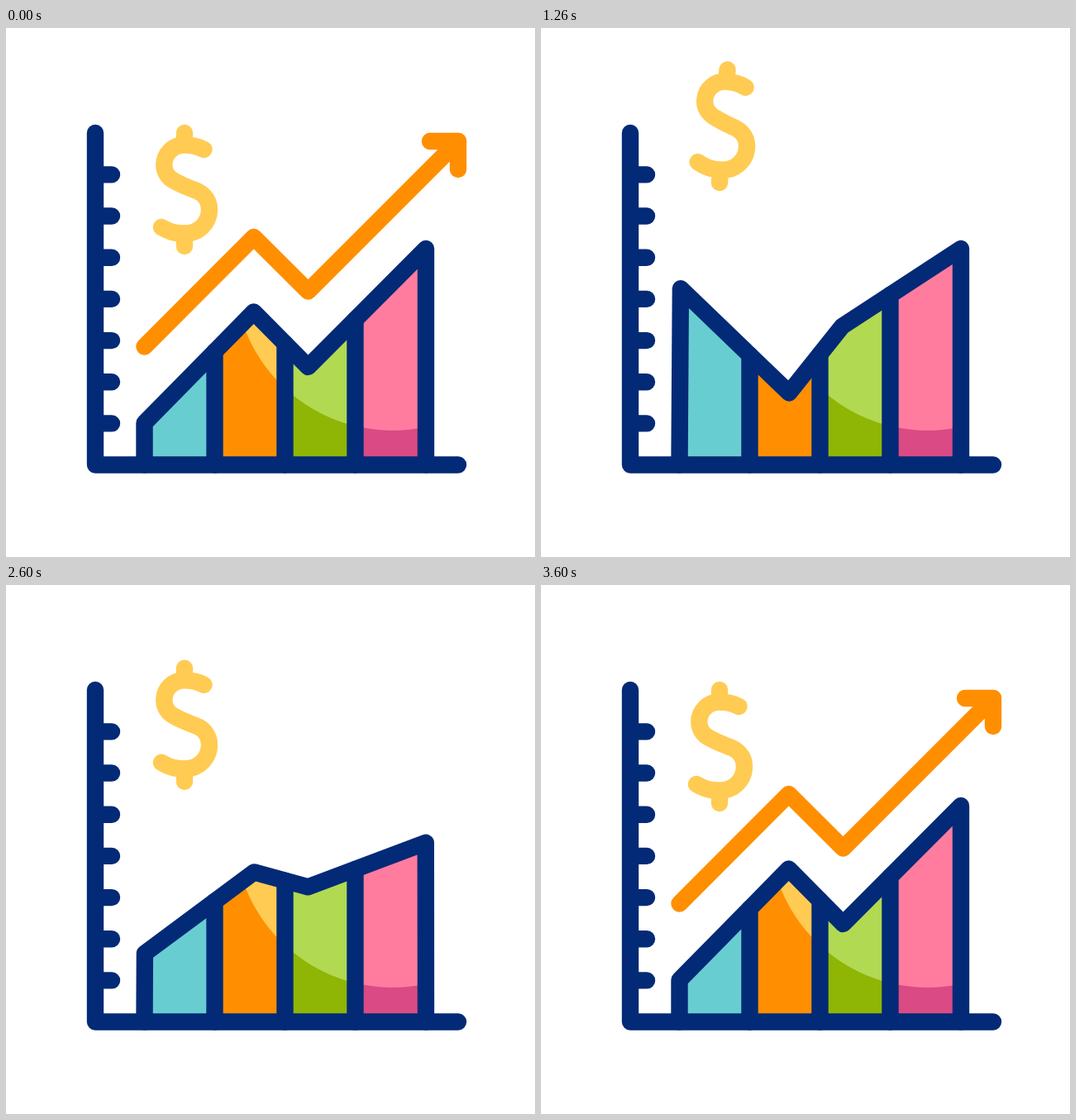
Write an HTML page that moves like this. It is 640x640 px and loops after 3620 ms.

```html
<!DOCTYPE html>
<html lang="en">
<head>
<meta charset="utf-8">
<title>Growth chart</title>
<style>
  html, body { margin: 0; width: 100%; height: 100%; overflow: hidden; background: #fff; }
  svg { display: block; width: 640px; height: 640px; }
  .line { fill: none; stroke-width: 20.4; stroke-linecap: round; stroke-linejoin: round; }
  .navy { stroke: #032a76; }
  .orange { stroke: #ff8f00; }
  .yellow { stroke: #ffcb52; }
</style>
</head>
<body>
<svg viewBox="0 0 640 640">
  <defs>
    <clipPath id="area"><polygon id="areaShape"/></clipPath>
    <clipPath id="disc"><circle cx="468" cy="295" r="192"/></clipPath>
  </defs>
  <g clip-path="url(#area)">
    <rect x="160" y="200" width="93" height="330" fill="#68cdd1"/>
    <rect x="252" y="200" width="86" height="330" fill="#ff8f00"/>
    <rect x="337" y="200" width="86" height="330" fill="#8fb505"/>
    <rect x="422" y="200" width="90" height="330" fill="#da4a84"/>
    <g clip-path="url(#disc)">
      <rect x="252" y="200" width="86" height="330" fill="#ffcb52"/>
      <rect x="337" y="200" width="86" height="330" fill="#b1d952"/>
      <rect x="422" y="200" width="90" height="330" fill="#ff7c9f"/>
    </g>
  </g>
  <path id="dividers" class="line navy"/>
  <polyline id="outline" class="line navy"/>
  <path id="axes" class="line navy"/>
  <g id="dollar">
    <path class="line yellow" d="M216 127V140M216 250V264M239.5 147C233 143.5 226 141.5 216 141.5C202 141.5 191.3 152 191.3 165.5C191.3 174 196 181 203.5 185C216 192 224 194 232 197.5C241 202 246 210 246 219.5C246 236 233 248.5 217 248.5C204 248.5 197 246.5 188 241"/>
  </g>
  <g id="arrow">
    <path id="trail" class="line orange" d="M167.5 385.5L299.7 253L365.5 318.5L547 137L1147 -463"/>
    <path id="head" class="line orange" d="M-34 0H0V34"/>
  </g>
</svg>
<script>
const LOOP = 3620, BASE = 528.5;
const $ = id => document.getElementById(id);
const lerp = (a, b, p) => a + (b - a) * p;

// Eased progress from time a to time b
function ease(t, a, b) {
  const p = Math.min(1, Math.max(0, (t - a) / (b - a)));
  return p * p * (3 - 2 * p);
}

// Top edge of the chart in its three poses
const rest = [[167.5, 478], [299.7, 343.5], [365.5, 410], [508, 267]];
const dip = [[169, 301], [300.2, 450], [364.5, 356.4], [508, 267]];
const peak = [[168.7, 383], [301, 355], [365.7, 279], [507.4, 398]];
const morph = (a, b, p) => a.map((v, i) => v.map((n, k) => lerp(n, b[i][k], p)));

function heightAt(pts, x) {
  const i = pts.findIndex(v => v[0] >= x), [a, b] = [pts[i - 1], pts[i]];
  return lerp(a[1], b[1], (x - a[0]) / (b[0] - a[0]));
}

function drawChart(t) {
  const pts = t < 1400 ? morph(rest, dip, ease(t, 600, 1400))
    : t < 2200 ? morph(dip, peak, ease(t, 1400, 2200))
    : morph(peak, rest, ease(t, 2200, 2860));
  const shape = [[167.5, BASE], ...pts, [508, BASE]].join(' ');
  $('outline').setAttribute('points', shape);
  $('areaShape').setAttribute('points', shape);
  $('dividers').setAttribute('d', [252.5, 337.5, 422.5]
    .map(x => `M${x} ${heightAt(pts, x)}V${BASE}`).join(''));
}

function drawDollar(t) {
  const lift = ease(t, 0, 640) - ease(t, 2200, 2860);
  const tilt = 4 * (ease(t, 640, 1240) - ease(t, 1240, 1840));
  $('dollar').setAttribute('transform', `translate(0 ${-77 * lift}) rotate(${tilt} 216 264)`);
}

const trail = $('trail');
const size = Math.hypot(132.2, 132.5) + Math.hypot(65.8, 65.5) + Math.hypot(181.5, 181.5);

// The arrow slides out along its own line, then grows back from the left
function drawArrow(t) {
  const leaving = t < 600, shown = leaving || t > 3000;
  $('arrow').style.display = shown ? '' : 'none';
  if (!shown) return;
  const tail = leaving ? 720 * ease(t, 0, 600) : 0;
  const tip = leaving ? tail + size : size * ease(t, 3000, 3600);
  trail.setAttribute('stroke-dasharray', `${tip - tail} 4000`);
  trail.setAttribute('stroke-dashoffset', -tail);
  const p = trail.getPointAtLength(tip);
  const turn = p.x > 299.8 && p.x < 365.4 ? 90 : 0;
  $('head').setAttribute('transform', `translate(${p.x} ${p.y}) rotate(${turn})`);
}

let axes = `M108 127V${BASE}H547`;
for (let i = 0; i < 7; i++) axes += `M108 ${177.4 + 50.17 * i}H128`;
$('axes').setAttribute('d', axes);

const start = performance.now();
function frame() {
  const t = (performance.now() - start) % LOOP;
  drawChart(t);
  drawDollar(t);
  drawArrow(t);
  requestAnimationFrame(frame);
}
frame();
</script>
</body>
</html>
```
